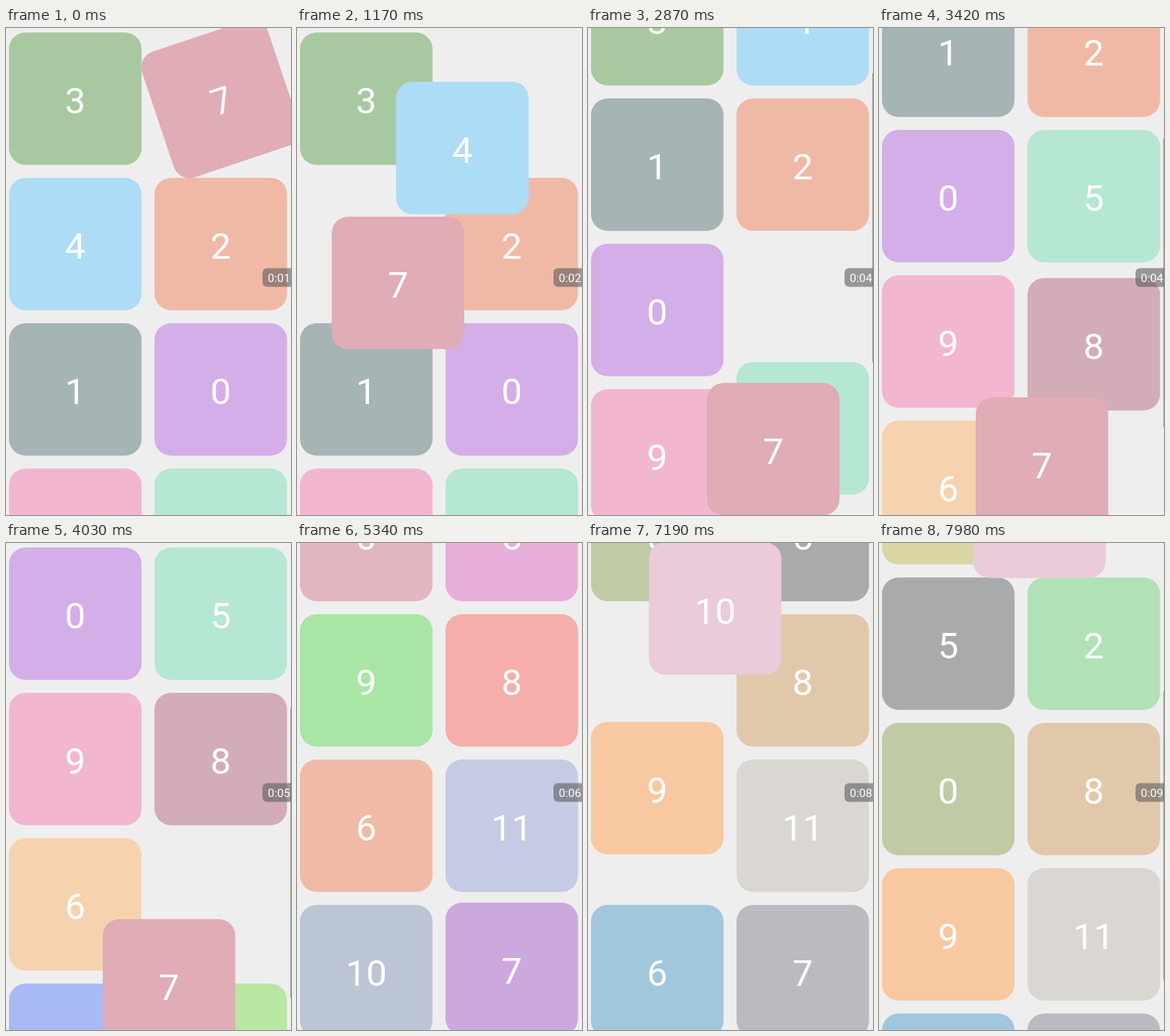
Animation, 380 px wide and 650 px high, one loop 8000 ms. Source, as an HTML page with a canvas:

```html
<!DOCTYPE html>
<html lang="en">
<head>
<meta charset="utf-8">
<title>Draggable grid</title>
<style>
  html, body { margin: 0; width: 100%; height: 100%; overflow: hidden; background: #eee; }
  canvas { display: block; }
</style>
</head>
<body>
<canvas id="stage" width="380" height="650"></canvas>
<script>
const ctx = document.getElementById('stage').getContext('2d');
const LOOP = 8000, SIZE = 176.7, PITCH = 194, LEFT = 4, TOP = 6, RADIUS = 22;
const FONT = 'Roboto, "Open Sans", sans-serif';

// Tile colours by number; the whole set is dealt anew on drop and on pick-up.
const palettes = [
  [0, '#d4aee8 #a5b4b5 #f0b9a6 #a8c9a0 #addcf6 #b5e7d3 #f6d2ae #e0acb6 #d2acb7 #f2b6d0 #a8baf5 #b9e7a2'],
  [5100, '#e2b6c0 #c9d8b0 #b4d4e4 #e8d2b0 #c4b8e0 #e8aedb #f0baa6 #cca8de #f5aeaa #a9e5a4 #bbc5d4 #c5cbe4'],
  [6030, '#c0cba5 #d9d5a5 #b0e2b6 #d8b8d0 #b4c8e0 #a9aaac #a0c7dc #bbbac1 #e2c8aa #f8c8a0 #ebcad9 #dad7d2']
].map(([at, list]) => ({ at, colors: list.split(' ') }));

const startOrder = [3, 7, 4, 2, 1, 0, 9, 5, 6, 8, 10, 11];

// [time, dragged tile, tile it trades places with]
const swaps = [
  [1020, 7, 4], [1430, 7, 1], [1791, 7, 0], [2800, 7, 5], [3193, 7, 8], [4300, 7, 11],
  [6860, 10, 6], [7026, 10, 9], [7390, 10, 0], [7540, 10, 5], [7690, 10, 2]
];

// [time, x, y] of the tile under the finger
const drags = [
  { id: 7, from: -300, to: 5100, path: [
    [440, 198, 6], [1020, 66, 200], [1250, 36, 279], [1430, 40, 394], [1600, 110, 425],
    [1800, 198, 433], [2500, 198, 433], [3000, 145, 488], [3420, 129, 493],
    [4030, 129, 502], [4560, 129, 502], [4900, 198, 440]] },
  { id: 10, from: 6000, to: LOOP + 1, path: [
    [6660, 4, 483], [7026, 62, 100], [7190, 81, -0.5], [7400, 105, -70], [7960, 125.5, -130]] }
];

const scrollPath = [[2490, 0], [3420, 258], [4030, 388], [4460, 493], [7300, 493], [7970, 348]];

const clamp = v => Math.max(0, Math.min(1, v));
const mix = (a, b, p) => a + (b - a) * p;
const ease = p => (1 - Math.cos(Math.PI * clamp(p))) / 2;

function along(path, t, k) {
  if (t <= path[0][0]) return path[0][k];
  for (let i = 1; i < path.length; i++) {
    const a = path[i - 1], b = path[i];
    if (t <= b[0]) return mix(a[k], b[k], (t - a[0]) / (b[0] - a[0]));
  }
  return path[path.length - 1][k];
}

const slotX = i => LEFT + (i % 2) * PITCH;
const slotY = i => TOP + Math.floor(i / 2) * PITCH;

function layout(t) {
  const tiles = [];
  startOrder.forEach((n, i) => { tiles[n] = { slot: i, old: i, since: -1000 }; });
  for (const [at, n, m] of swaps) {
    if (t < at) break;
    const a = tiles[n], b = tiles[m], home = a.slot;
    a.slot = a.old = b.slot;
    b.old = b.slot;
    b.slot = home;
    b.since = at;
  }
  return tiles;
}

// Tilt on pick-up, then back to level
function tilt(t, start) {
  const up = ease((t - start) / 200), down = ease((t - start - 200) / 320);
  return -18.5 * Math.PI / 180 * (up - down);
}

function tile(n, x, y, color, angle = 0) {
  if (y > 650 || y < -210) return;
  const h = SIZE / 2;
  ctx.save();
  ctx.translate(x + h, y + h);
  ctx.rotate(angle);
  ctx.fillStyle = color;
  ctx.beginPath();
  ctx.roundRect(-h, -h, SIZE, SIZE, RADIUS);
  ctx.fill();
  ctx.fillStyle = '#fff';
  ctx.font = '49px ' + FONT;
  ctx.textAlign = 'center';
  ctx.fillText(n, 0, 20);
  ctx.restore();
}

function scrollbar(t, scroll) {
  const first = clamp((t - 2540) / 40) * (1 - clamp((t - 4760) / 250));
  ctx.globalAlpha = Math.max(first, clamp((t - 7320) / 40));
  ctx.fillStyle = '#a2a2a2';
  ctx.fillRect(379, Math.round(scroll * 0.5695), 1, 386);
  ctx.globalAlpha = 1;
}

function badge(t) {
  ctx.fillStyle = 'rgba(90,90,90,.58)';
  ctx.beginPath();
  ctx.roundRect(342, 320.5, 50, 25, 6);
  ctx.fill();
  ctx.fillStyle = '#fff';
  ctx.font = '15.5px ' + FONT;
  ctx.textAlign = 'left';
  ctx.fillText('0:0' + (1 + Math.floor((t + 200) / 1000)), 349, 339);
}

function draw(t) {
  ctx.fillStyle = '#eee';
  ctx.fillRect(0, 0, 380, 650);

  const scroll = Math.round(along(scrollPath, t, 1));
  const { colors } = palettes.filter(p => t >= p.at).pop();
  const drag = drags.find(d => t >= d.from && t < d.to);
  const settle = ease((t - 5100) / 290);
  const dropping = t >= 5100 && settle < 1;

  layout(t).forEach((item, n) => {
    if (drag && drag.id === n) return;
    const p = ease((t - item.since) / 250);
    const x = mix(slotX(item.old), slotX(item.slot), p);
    let y = mix(slotY(item.old), slotY(item.slot), p) - scroll;
    if (n === 7 && dropping) y = mix(440, y, settle);
    tile(n, x, y, colors[n]);
  });
  if (drag) {
    const { id, path, from } = drag;
    tile(id, along(path, t, 1), along(path, t, 2), colors[id], tilt(t, id === 7 ? -200 : from));
  }
  scrollbar(t, scroll);
  badge(t);
}

function frame() {
  draw(performance.now() % LOOP);
  requestAnimationFrame(frame);
}
frame();
</script>
</body>
</html>
```
